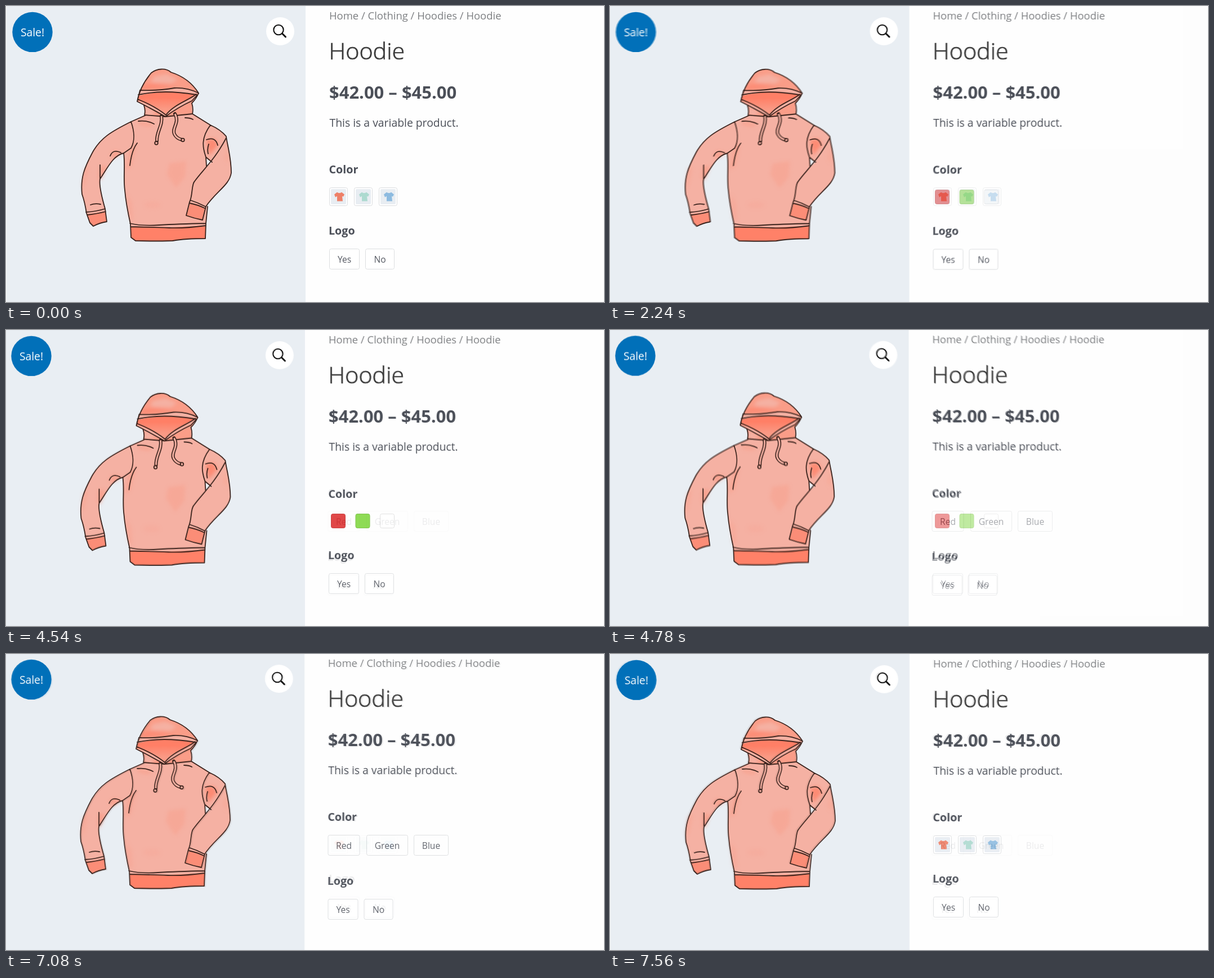
Write an HTML page that moves like this. It is 1062 by 527 pixels and loops after 7.62 s.

```html
<!DOCTYPE html>
<html lang="en">
<head>
<meta charset="utf-8">
<title>Product swatches</title>
<style>
html, body { margin: 0; width: 100%; height: 100%; overflow: hidden; background: #fff }
svg { display: block; width: 100%; height: 100% }
text { font-family: "Open Sans", "Noto Sans", sans-serif; fill: #4b4f58 }
.crumb { font-size: 18.43px; fill: #7d7f82 }
.title { font-size: 41.3px; font-weight: 300; fill: #3a3a3a; stroke: #3a3a3a; stroke-width: .7px }
.price { font-size: 31px; font-weight: 700 }
.desc { font-size: 19.35px }
.label { font-size: 19.7px; font-weight: 700 }
.sale { font-size: 19.3px; fill: #fff; text-anchor: middle }
.option { font-size: 15.6px; fill: #555962; text-anchor: middle }
.box { fill: #fff; stroke: #dcdee0 }
.ink { fill: none; stroke: #38211b; stroke-width: 1.8; stroke-linecap: round; stroke-linejoin: round }
.cloth { fill: #f5b1a3 }
.mid { fill: #fa9d88 }
.cuff { fill: #fb8d77 }
.deep { fill: #ff8168 }
</style>
</head>
<body>
<svg id="stage" viewBox="0 0 1062 527">
<defs>
  <filter id="soft" x="-40%" y="-40%" width="180%" height="180%"><feGaussianBlur stdDeviation="3"/></filter>
  <linearGradient id="lining" x2="0" y2="1"><stop offset=".25" stop-color="#ff7f66"/><stop offset=".75" stop-color="#fa9a85"/></linearGradient>
  <path id="tee" d="M-4-8Q0-5 4-8L9-4 7 0 5-1 6 8-4 8-4-1-7 1-9-4Z"/>
  <clipPath id="hoodClip"><path d="M233 170C236 152 243 137 258 119C268 111 284 110 293 118C312 124 330 136 342 155L330 173 331 192 283 197 247 195 245 177Z"/></clipPath>
  <path id="strings" d="M276 196C279 212 267 224 268 240M300 192C309 208 294 217 299 228C302 234 308 237 312 238"/>
  <g id="hoodie">
    <!-- body -->
    <path class="cloth" d="M247 194L222 206C227 224 228 241 222 253L209 262C212 285 208 305 211 328C213 352 217 370 221 388V396H355V387L357 350 357 280 365 213 331 192 283 197Z"/>
    <g class="mid" filter="url(#soft)" opacity=".6">
      <path d="M290 280L320 276 318 304 302 324 286 300Z" opacity=".7"/>
      <path d="M222 250L231 246 222 285 213 292Z"/>
      <path d="M234 204L262 210 255 215 238 212Z"/>
      <path d="M215 335L224 350 226 382 219 380Z" opacity=".6"/>
      <ellipse cx="260" cy="354" rx="15" ry="6" opacity=".3"/>
    </g>
    <path class="deep" d="M221 393Q290 396 355 391L354 414Q318 414 296 418Q258 419 230 418L222 412Z"/>
    <path class="ink" d="M247 195L222 206M209 262C212 285 208 305 211 328C213 352 217 370 221 388L222 412L230 418Q258 419 296 418Q318 414 354 414L355 387L358 357M220 387Q240 392 272 390T355 387M221 393Q262 394 290 395T355 391M233 244Q223 257 220 284M235 205Q250 203 263 210M318 199Q327 199 332 202"/>
    <!-- left sleeve -->
    <path class="cloth" d="M222 206C186 224 168 235 154 260C139 288 132 306 135 335Q140 349 144 372L177 366 176 361C171 341 164 318 167 308C180 289 190 266 209 262L222 253C230 239 227 220 222 206Z"/>
    <g class="mid" filter="url(#soft)" opacity=".8">
      <path d="M185 268L191 258 206 261 194 270Z"/>
      <path d="M167 285L178 286 168 311 165 305Z"/>
      <path d="M139 290L147 285 140 318 135 325Z" opacity=".5"/>
    </g>
    <path class="cuff" d="M143 371L177 366 179 384Q166 386 155 392L149 386Z"/>
    <path class="ink" d="M222 206C186 224 168 235 154 260C139 288 132 306 135 335Q140 349 143 369L149 386 155 392Q166 386 179 384L176 361C170 340 165 318 167 308C180 289 190 266 209 262L222 253C230 239 227 220 222 206M167 307L167 283M185 267Q190 254 204 261M150 354Q158 351 168 353M142 367Q160 366 176 361M144 372Q162 370 177 366"/>
    <!-- right sleeve -->
    <path class="cloth" d="M363 212Q381 220 391 232C393 248 400 269 400 297C397 319 373 330 355 357L354 361 326 352V349C332 337 329 318 335 312L357 285 355 269C349 252 346 235 363 212Z"/>
    <g class="mid" filter="url(#soft)">
      <path class="deep" d="M356 238L370 236 377 247 361 266 358 249Z" opacity=".8"/>
      <path d="M392 250L395 280 388 271Z" opacity=".4"/>
    </g>
    <path d="M355 270Q361 277 367 276L356 287Z" fill="#e9eef3"/>
    <path class="cuff" d="M327 351L354 360 349 381 320 373Z"/>
    <path class="ink" d="M331 192L363 212Q381 220 391 232C393 248 400 269 400 297C397 319 373 330 355 357L349 381Q334 378 320 373L326 349C332 337 329 318 335 312C350 291 370 275 391 235M363 212C346 235 349 252 355 269L366 278M355 269L356 285M356 238Q372 232 376 248M360 246Q357 255 359 263M328 346Q341 350 354 357M326 351Q341 354 353 360"/>
    <!-- hood -->
    <g clip-path="url(#hoodClip)">
      <path class="mid" d="M230 108H345V200H230Z"/>
      <g filter="url(#soft)">
        <path class="cloth" d="M262 126L285 121 305 130 294 138 258 137Z"/>
        <path class="deep" d="M240 142L262 137 305 143 245 149Z" opacity=".6"/>
        <path class="cloth" d="M246 178L265 187 263 195 246 195Z"/>
      </g>
      <path class="cloth" d="M238 151Q270 150 299 146Q322 145 342 155L339 162Q311 151 279 154L235 160Z"/>
      <path fill="url(#lining)" d="M235 160Q279 148 337 157C323 168 300 175 285 194Q264 179 234 168Z"/>
      <path class="cloth" d="M233 168Q263 178 284 194C297 176 325 168 339 157L342 158C328 171 304 180 284 198Q257 184 233 172Z"/>
    </g>
    <path class="ink" d="M233 170C236 152 243 137 258 119C268 111 284 110 293 118C312 124 330 136 342 155Q338 165 330 173Q333 183 331 192L283 197 246 194Q248 185 245 177M233 170Q257 182 283 197Q306 180 330 169L342 156M234 166Q264 178 284 194C297 176 324 168 338 157M238 150Q270 151 299 146Q322 145 342 155M235 158Q259 153 283 153T338 158M238 150L233 170"/>
    <use href="#strings" class="ink" style="stroke-width:6"/>
    <use href="#strings" fill="none" stroke="#f5b1a3" stroke-width="2.8"/>
    <g class="ink" style="fill:#f5b1a3"><circle cx="267" cy="244" r="2.8"/><circle cx="314" cy="238.5" r="2.8"/></g>
  </g>
</defs>
</svg>
<script>
const HOLD = 2000, STEP = 60, PART = 2540;

const text = (cls, x, y, s) => `<text class="${cls}" x="${x}" y="${y}">${s}</text>`;
const rect = (x, y, w, h, attrs) => `<rect x="${x}" y="${y}" width="${w}" height="${h}" ${attrs}/>`;
const button = (x, y, w, s) =>
  rect(x + .5, y + .5, w - 1, 36, 'rx="3" class="box"') + text('option', x + w / 2, y + 24.5, s);

const teeSwatch = (color, i) => {
  const x = 574 + 44 * i;
  return rect(x + .5, 323.5, 32, 32, 'rx="3" class="box"') +
    rect(x + 3, 326, 27, 27, 'rx="2" fill="#e8edf2"') +
    `<use href="#tee" x="${x + 18}" y="339.5" fill="${color}"/>`;
};
const colorSwatch = ([fill, edge], i) =>
  rect(577.5 + 43.5 * i, 327.5, 25, 25, `rx="3" fill="${fill}" stroke="${edge}"`);

// x, y: shift of the copy; edge: photo panel; sale: badge centre; logoY: baseline of the second label
function slide({ x, y, left, edge, sale, photo, colorY, logoY, buttonX, buttonY, swatches }) {
  const [sx, sy] = sale, [px, py] = photo;
  return `<g>
    ${rect(0, 0, 1062, 527, 'fill="#fefefe"')}
    ${rect(left, 0, edge - left, 527, 'fill="#e9eef3"')}
    <use href="#hoodie" x="${px}" y="${py}"/>
    <circle cx="${sx}" cy="${sy}" r="35.7" fill="#0170b9"/>
    ${text('sale', sx, sy + 8, 'Sale!')}
    <g transform="translate(${x} ${y})">
      <circle cx="487" cy="45" r="25" fill="#fff"/>
      <g fill="none" stroke="#111"><circle cx="484" cy="42.5" r="8.7" stroke-width="2.1"/>
      <path d="M490.5 49L496.5 55" stroke-width="3" stroke-linecap="round"/></g>
      ${text('crumb', 574, 24, 'Home / Clothing / Hoodies / Hoodie')}
      ${text('title', 573.5, 95, 'Hoodie')}
      ${text('price', 574, 165, '$42.00 – $45.00')}
      ${text('desc', 574.5, 214.5, 'This is a variable product.')}
    </g>
    ${text('label', 573.5 + x, colorY, 'Color')}
    ${swatches}
    ${text('label', 573 + x, logoY, 'Logo')}
    ${button(buttonX, buttonY, 54, 'Yes')}
    ${button(buttonX + 64, buttonY, 52, 'No')}
  </g>`;
}

const stage = document.getElementById('stage');
stage.insertAdjacentHTML('beforeend', [
  { x: 0, y: 0, left: 1, edge: 532, sale: [47, 46.4], photo: [0, 0],
    colorY: 298, logoY: 407, buttonX: 574, buttonY: 432,
    swatches: ['#ee8068', '#addad0', '#8dbbe0'].map(teeSwatch).join('') },
  { x: -1, y: 0, left: 0, edge: 531, sale: [45, 46.4], photo: [-1.5, .5],
    colorY: 299, logoY: 408, buttonX: 573, buttonY: 433,
    swatches: [['#dd3333', '#c42d2d'], ['#81d742', '#72be3a'], ['#fff', '#dedede']].map(colorSwatch).join('') },
  { x: -2.3, y: -1, left: 0, edge: 530, sale: [45, 45.4], photo: [-2, -1],
    colorY: 297, logoY: 411, buttonX: 571.5, buttonY: 436,
    swatches: button(571.5, 322, 57, 'Red') + button(640, 322, 74, 'Green') + button(724, 322, 62, 'Blue') }
].map(slide).join(''));

const [, second, third] = stage.querySelectorAll(':scope > g');

function draw(now) {
  const t = now % (3 * PART), part = Math.floor(t / PART), k = t % PART;
  const p = k < HOLD ? 0 : (Math.floor((k - HOLD) / STEP) + 1) / 10;
  second.style.opacity = [p, 1, 0][part];
  third.style.opacity = [0, p, 1 - p][part];
  requestAnimationFrame(draw);
}
draw(performance.now());
</script>
</body>
</html>
```
